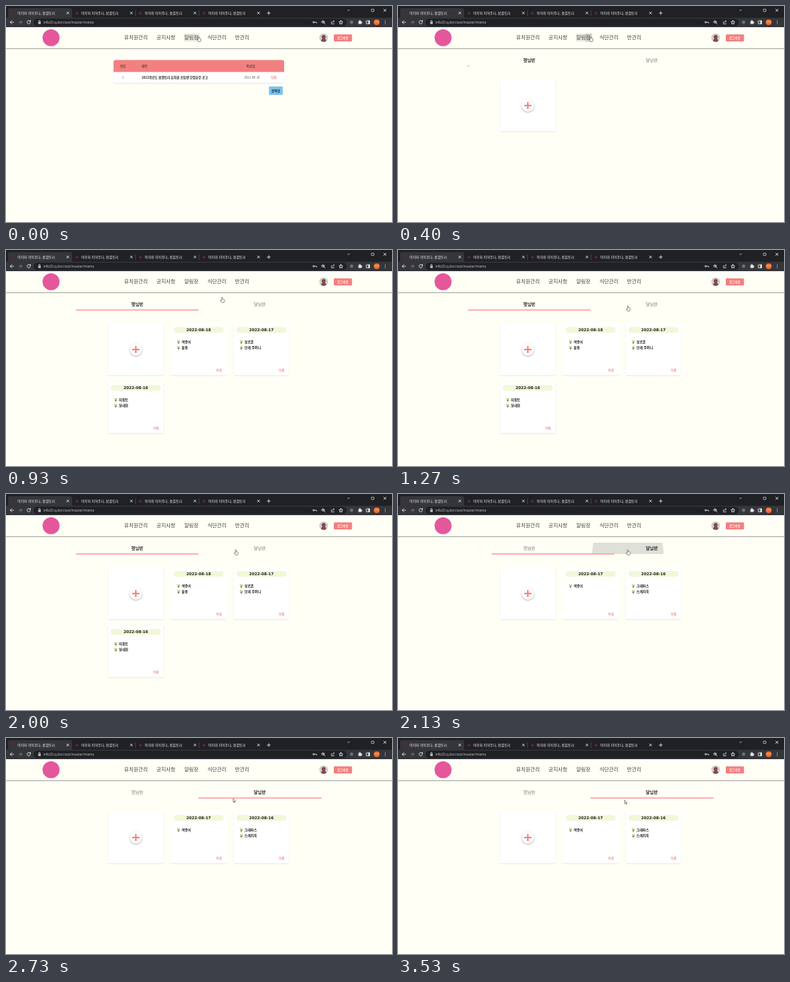
An HTML page for the animation above (3.59 s loop, 544 px wide and 306 px high).

```html
<!DOCTYPE html>
<html lang="ko">
<head>
<meta charset="utf-8">
<title>봄결토리</title>
<style>
  html, body { margin: 0; width: 100%; height: 100%; overflow: hidden; background: #fffff6; }
  svg { display: block; width: 544px; height: 306px; }
  text { font-family: "Noto Sans CJK KR", "Noto Sans CJK", "Noto Sans", sans-serif; white-space: pre; }
  .num { font-family: "DejaVu Sans", sans-serif; }
  .url { font-family: "Noto Sans", "Open Sans", sans-serif; }
  .line { fill: none; stroke: #dfe1e5; stroke-width: .9; stroke-linecap: round; stroke-linejoin: round; }
</style>
</head>
<body>
<svg id="stage" viewBox="0 0 544 306" xmlns="http://www.w3.org/2000/svg"></svg>
<script>
const LOOP = 3590, STEP = 200 / 3;
const CORAL = '#f47d7d', IVORY = '#fffff6';

// y is the middle of the line of text
const label = (x, y, str, size, fill, more = '') =>
  `<text x="${x}" y="${y + size * .37}" font-size="${size}" fill="${fill}" ${more}>${str}</text>`;
const rect = (x, y, w, h, fill, r = 0, more = '') =>
  `<rect x="${x}" y="${y}" width="${w}" height="${h}" rx="${r}" fill="${fill}" ${more}/>`;
const dot = (x, y, r, fill, more = '') =>
  `<circle cx="${x}" cy="${y}" r="${r}" fill="${fill}" ${more}/>`;
const line = (d, more = '') => `<path class="line" d="${d}" ${more}/>`;
const group = (id, inner) => `<g id="${id}">${inner}</g>`;
const MID = 'text-anchor="middle"', BOLD = 'font-weight="700"', MEDIUM = 'font-weight="500"';

function browserTab(i) {
  const x = 3 + i * 89.6;
  return (i ? '' : `<path d="M1 17q2 0 2-2V6q0-3 3-3h84q3 0 3 3v9q0 2 2 2z" fill="#35363a"/>`) +
    dot(x + 7.2, 10.2, 2, '#5e2440') +
    label(x + 13.3, 9.8, '아이와 이어주다, 봄결토리', 4.8, '#e8eaed', MEDIUM) +
    line(`M${x + 82.6} 8.4l3 3m0-3l-3 3`) +
    (i > 0 && i < 3 ? rect(x + 89.6, 6, .5, 8, '#5f6368') : '');
}

function browser() {
  return rect(0, 0, 544, 17, '#202124') + [0, 1, 2, 3].map(browserTab).join('') +
    line('M368.2 10h4.2M370.3 7.9v4.2') +
    `<g opacity=".75">` + line('M481.4 5.4l1.4 1.4 1.4-1.4M515.3 4.5h3.2v3.2h-3.2z') + '</g>' +
    line('M532.3 4.4l3.4 3.4m0-3.4l-3.4 3.4') +
    rect(0, 16.7, 544, 13.3, '#35363a') +
    rect(39, 18, 441, 10.4, '#202124', 5.2) +
    line('M10.8 23H6m2.2-2.3L5.9 23l2.3 2.3') +
    line('M17.6 23h4.8m-2.2-2.3l2.3 2.3-2.3 2.3', 'opacity=".4"') +
    line('M34 21.4a2.4 2.4 0 1 0 .4 2.2M34.5 20.3v1.7h-1.7') +
    rect(45.4, 22.4, 3.6, 3, '#bdc1c6', .5) + line('M46.2 22.3v-.8a1 1 0 0 1 2 0v.8') +
    line('M434.6 23a1.1 1.1 0 1 0 0 .1zm.2 0h3v1.2') +
    line('M448.6 22.5a1.8 1.8 0 1 0 0 .1zm-.5 1.2l1.8 1.8M446 22.5h1.6') +
    `<g opacity=".75">` + line('M458.6 22v3.5h3.6v-1M459.8 23.8q.3-2.3 2.6-2.3m-1-1.2l1.2 1.2-1.2 1.2') + '</g>' +
    line('M472 20.4l.8 1.8 2 .2-1.5 1.3.4 2-1.7-1-1.7 1 .4-2-1.5-1.3 2-.2z') +
    dot(487, 23, 2.4, '#5f7388') +
    rect(496.6, 21.2, 4.4, 4.4, '#dfe1e5', .6) + dot(498.7, 20.9, 1, '#dfe1e5') + dot(501.2, 23.4, 1, '#dfe1e5') +
    line('M508.2 21h4.2v4.2h-4.2z') + rect(510.4, 20.6, 2.4, 5, '#dfe1e5') +
    dot(522.4, 23, 4.1, '#ee6c2c') + label(522.4, 23, '나리', 3.5, '#fbe3d5', MID) +
    [21, 23, 25].map(y => dot(534.5, y, .6, '#dfe1e5')).join('') +
    label(53, 23, '', 4.75, '#bdc1c6', 'class="url" id="url"');
}

function siteHeader() {
  const menu = [[166.5, '유치원관리'], [212, '공지사항'], [251.2, '알림장'], [284, '식단관리'], [322.8, '반관리']];
  return rect(0, 30, 544, 30, IVORY, 0, 'filter="url(#bar)"') +
    dot(63.5, 45, 12, '#e4589b') +
    rect(250.5, 39, 23, 11.5, '#ebebe3', 1, 'id="hover"') +
    rect(250.5, 39, 23, 11.5, '#d3d3cb', 1, 'id="press"') +
    menu.map(([x, s]) => label(x, 44.7, s, 7.25, '#444', MEDIUM)).join('') +
    dot(447.7, 45, 6.2, '#d3cdcd') +
    `<path d="M444 49.2q.5-2.6 2.3-3a2.8 2.8 0 1 1 2.8 0q2 .4 2.4 3a6 6 0 0 1-7.5 0z" fill="#7d4a48"/>` +
    rect(462, 40.2, 25.6, 10, CORAL, 1) + label(474.8, 45.1, '로그아웃', 4.3, '#fff', MID + ' ' + BOLD);
}

function noticePage() {
  return rect(151.6, 76.5, 240.4, 32.5, '#fff', 3, 'filter="url(#soft)"') +
    `<path d="M151.6 93.5v-14q0-3 3-3H389q3 0 3 3v14z" fill="#f28080"/>` +
    [[161, '번호'], [191, '제목'], [338.8, '작성일']].map(([x, s]) => label(x, 85, s, 4.4, '#222', MEDIUM)).join('') +
    label(165, 101.2, '1', 4.2, '#555', MID) +
    label(191.2, 101.2, '2022학년도 봄결토리 유치원 신입생 모집요강 공고', 4.4, '#222', BOLD) +
    label(335.6, 101.2, '2022-08-18', 4.3, '#666') +
    label(373, 101.2, '삭제', 4.4, '#e85555', MEDIUM) +
    rect(370.6, 114, 19.4, 12, '#7cc3f2', 1) +
    label(380.3, 120, '글작성', 4.5, '#222', MID + ' ' + BOLD);
}

const sheet = (x, y) => rect(x, y, 79, 72.5, '#fff', 2, 'filter="url(#soft)"');

const sprout = (x, y) =>
  `<path d="M${x - 2.2} ${y - 1.8}q2.4-.7 2.6 1.4 1-1.9 2.1-1-.2 1.8-2 2z" fill="#8cc152"/>` +
  `<path d="M${x - 1.2} ${y + .4}h3l-.5 2h-2z" fill="#8a7a4a"/>`;

function card(col, row, date, items) {
  const x = 143.5 + col * 88.5, y = 105 + row * 82;
  return sheet(x, y) + rect(x + 4.5, y + 4.3, 70, 8, '#f0f8d6', 3.5) +
    label(x + 39.5, y + 8.2, date, 5.4, '#222', `class="num" ${MID} ${BOLD}`) +
    items.map((s, i) => sprout(x + 10.8, y + 25 + i * 8.3) +
      label(x + 15.6, y + 25 + i * 8.3, s, 4.75, '#222', BOLD)).join('') +
    label(x + 67.7, y + 65, '삭제', 4.4, '#ea6060', MID + ' ' + MEDIUM);
}

function memoPage() {
  return `<clipPath id="tabBox"><rect x="271.5" y="69" width="173" height="16"/></clipPath>` +
    `<g clip-path="url(#tabBox)">${dot(324, 82, 0, '#dfe0d7', 'id="ripple"')}</g>` +
    label(185, 76.8, '햇님반', 6.1, '#222', MID + ' id="sun"') +
    label(357.6, 76.8, '달님반', 6.1, '#777', MID + ' id="moon"') +
    rect(98.5, 84.2, 173, 1.6, '#ff9f9f', 0, 'id="slider"') +
    sheet(143.5, 105) +
    dot(183, 141, 8.6, '#fdfdfb', 'filter="url(#fab)"') +
    `<path d="M178 141h10M183 136v10" stroke="#fb7c80" stroke-width="1.9"/>` +
    group('sunCards',
      card(1, 0, '2022-08-18', ['색종이', '물통']) +
      card(2, 0, '2022-08-17', ['실로폰', '모래 주머니']) +
      card(0, 1, '2022-08-16', ['지점토', '실내화'])) +
    group('moonCards',
      card(1, 0, '2022-08-17', ['색종이']) +
      card(2, 0, '2022-08-16', ['크레파스', '스케치북']));
}

const shadow = (id, dy, blur, alpha) =>
  `<filter id="${id}" x="-20%" y="-20%" width="140%" height="150%">` +
  `<feDropShadow dx="0" dy="${dy}" stdDeviation="${blur}" flood-color="#000" flood-opacity="${alpha}"/></filter>`;

const pen = 'fill="#fff" stroke="#333" stroke-width=".55" stroke-linejoin="round"';
const pointers = group('hand', `<path d="M-1-3.7q.7-.6 1.2.2v2.2l2.1.4q.9.2.8 1.1l-.4 2-.5 1.2h-2.9l-1.8-2.3q-.2-.9.6-.6l.9.4z" ${pen}/>`) +
  group('arrow', `<path d="M-1.2-2.9v5l1.2-1 .8 1.8.8-.4-.8-1.7h1.5z" ${pen}/>`);

document.getElementById('stage').innerHTML =
  `<defs>${shadow('bar', .7, .7, .5)}${shadow('soft', .3, .5, .3)}${shadow('fab', .9, .9, .4)}</defs>` +
  rect(0, 0, 544, 306, IVORY) + group('notice', noticePage()) + group('memo', memoPage()) +
  siteHeader() + browser() + pointers;

const el = {};
document.querySelectorAll('[id]').forEach(n => el[n.id] = n);
const set = (id, attrs) => { for (const k in attrs) el[id].setAttribute(k, attrs[k]); };
const show = (id, on) => set(id, { display: on ? 'inline' : 'none' });
const part = (t, from, to) => Math.min(1, Math.max(0, (t - from) / (to - from)));
const mix = (a, b, p) => a + (b - a) * p;
const smooth = p => p * p * (3 - 2 * p);

// cubic-bezier(.25, .8, .5, 1)
function swift(p) {
  const curve = (s, a, b) => 3 * (1 - s) ** 2 * s * a + 3 * (1 - s) * s * s * b + s ** 3;
  let lo = 0, hi = 1;
  for (let i = 0; i < 24; i++) {
    const s = (lo + hi) / 2;
    if (curve(s, .25, .5) < p) lo = s; else hi = s;
  }
  return curve(hi, .8, 1);
}

// time, x, y
const path = [[0, 271.8, 47], [640, 271.8, 47], [1130, 323, 84], [1200, 323.5, 83.5], [1260, 324.2, 83],
  [2480, 324.2, 83], [2860, 320.3, 90.7], [3300, 320.3, 90.7], [3520, 320.7, 91], [LOOP, 320.7, 91]];

function pointerAt(t) {
  const i = Math.max(1, path.findIndex(k => k[0] >= t));
  const a = path[i - 1], b = path[i], p = smooth(part(t, a[0], b[0]));
  return [mix(a[1], b[1], p), mix(a[2], b[2], p)];
}

function draw(t) {
  const memo = t >= 325, moon = t >= 2114;
  el.url.textContent = 'k4b20.q.dori.test/master/' + (memo ? 'memo' : 'notice');
  show('notice', !memo);
  show('memo', memo);
  show('sunCards', t >= 460 && !moon);
  show('moonCards', moon);

  const left = mix(263.5, 250.5, part(t, 400, 530)), leave = 1 - part(t, 640, 840);
  set('hover', { opacity: leave });
  set('press', { x: left, width: 273.5 - left, opacity: t < 395 ? 0 : leave });

  set('slider', {
    x: 98.5 + 173 * swift(part(t, 2114, 2414)),
    width: 173 * swift(part(t, 399, 699))
  });
  set('sun', { fill: moon ? '#777' : '#222', 'font-weight': moon ? 500 : 700 });
  set('moon', { fill: moon ? '#222' : '#777', 'font-weight': moon ? 700 : 500 });
  set('ripple', {
    r: mix(0, 126, part(t, 2000, 2335)),
    opacity: part(t, 2000, 2100) * (1 - part(t, 2270, 2470))
  });

  const [x, y] = pointerAt(t);
  const link = (y < 51 && x < 274) || (y > 69 && y < 86);
  show('hand', link);
  show('arrow', !link);
  set(link ? 'hand' : 'arrow', { transform: `translate(${x} ${y})` });
}

const start = performance.now();
function tick() {
  const t = (performance.now() - start) % LOOP;
  draw(Math.floor((t + 4) / STEP) * STEP);
  requestAnimationFrame(tick);
}
draw(0);
tick();
</script>
</body>
</html>
```
